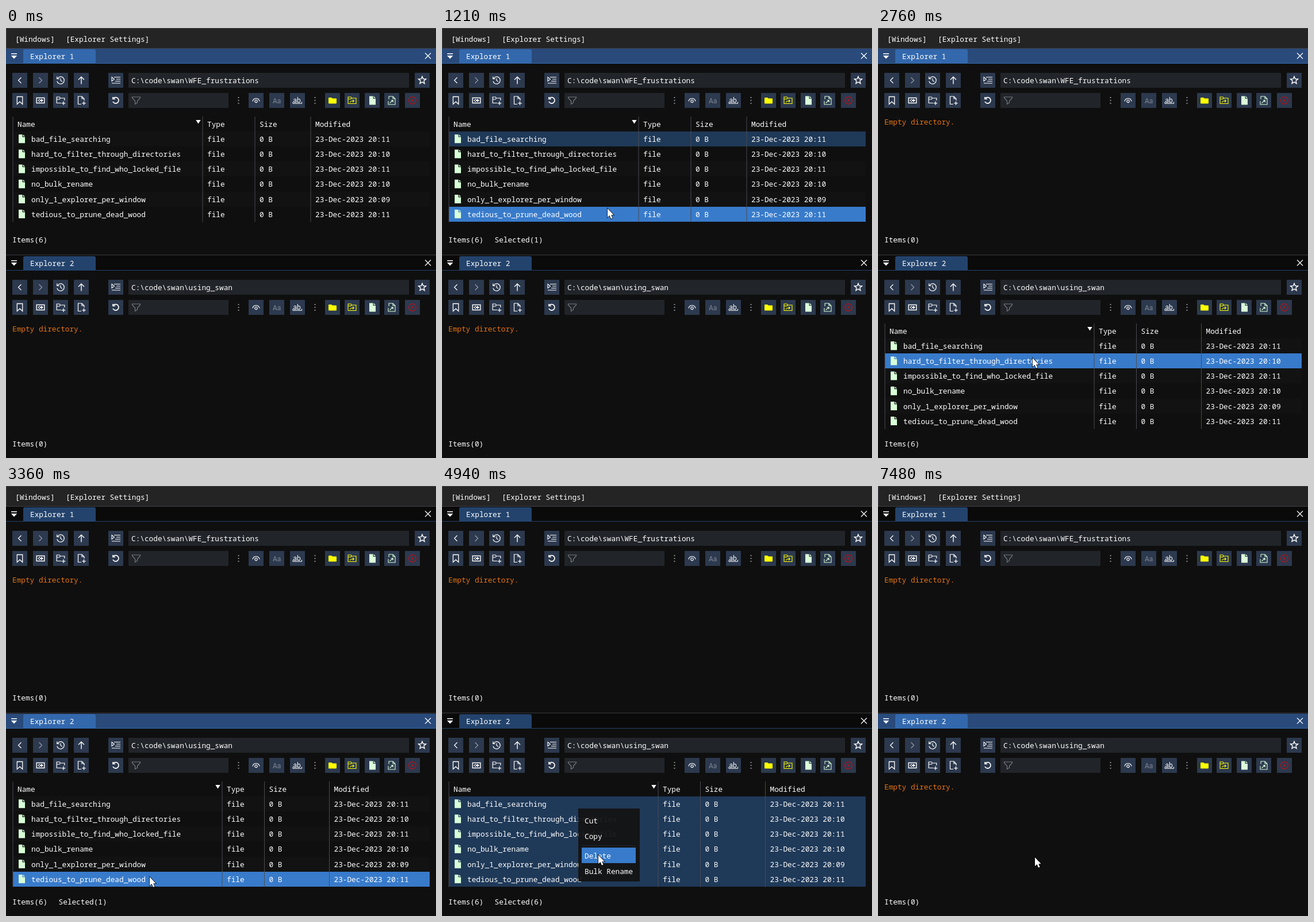
Write an HTML page with a canvas that moves like this. It is 748 by 748 pixels and loops after 7510 ms.

```html
<!DOCTYPE html>
<html lang="en">
<head>
<meta charset="utf-8">
<title>Explorer</title>
<style>
html, body { margin: 0; width: 100%; height: 100%; overflow: hidden; background: #0f0f0f; }
canvas { display: block; width: 100vw; height: 100vh; }
</style>
</head>
<body>
<canvas id="stage" width="748" height="748"></canvas>
<script>
const ctx = document.getElementById('stage').getContext('2d');
const LOOP = 7510;
const MONO = '12.75px "Noto Sans Mono", "DejaVu Sans Mono", monospace';
const SANS = '12px Roboto, "Open Sans", sans-serif';
const C = {
  bg: '#0f0f0f', bar: '#242424', edge: '#404046', line: '#4b4b52',
  title: '#294a7a', titleOff: '#0a0a0a', tab: '#3368ad', tabOff: '#23436c',
  button: '#2c394e', field: '#212429', hover: '#387bcb', selected: '#1f3958',
  orange: '#e57412', yellow: '#ffff00', green: '#d9ffd9', red: '#b3141c', dim: '#77797e'
};

// Moments when the interface state changes
const T = { pick: 850, pickAll: 1400, drag: 2080, drop: 2420, pick2: 3330,
            pickAll2: 3950, menu: 4350, confirm: 5100, gone: 5190 };

const FILES = [
  ['bad_file_searching', 11], ['hard_to_filter_through_directories', 10],
  ['impossible_to_find_who_locked_file', 11], ['no_bulk_rename', 10],
  ['only_1_explorer_per_window', 9], ['tedious_to_prune_dead_wood', 11]
];
const MENU = [['Cut', 568], ['Copy', 595], ['Delete', 629], ['Bulk Rename', 656]];

// time, x, y of the pointer tip
const PATH = [
  [280, -14, 215], [700, 270, 196], [900, 270, 194], [1210, 288, 314],
  [1450, 290, 321], [2030, 279, 298], [2080, 279, 300], [2300, 272, 520],
  [2430, 269, 562], [2760, 269, 574], [3250, 250, 680], [3400, 250, 680],
  [3930, 236, 561], [4450, 236, 561], [4900, 272, 642], [5060, 272, 642], [5200, 273, 646]
];

const DOC = 'M-5-7.5H1.5V-3H6V7.5H-5ZM2.7-7.5L6-4.2H2.7Z';
const FOLDER = 'M-7-4Q-7-5-6-5H-2L0-3.5H6Q7-3.5 7-2.5V4.5Q7 5.5 6 5.5H-6Q-7 5.5-7 4.5Z';
const ARROW = new Path2D('M0 0V15.2L3.5 12L6 17.8L8.6 16.7L6.2 11.2H10.6Z');

function rect(color, x, y, w, h, r = 0) {
  ctx.fillStyle = color;
  ctx.beginPath();
  ctx.roundRect(x, y, w, h, r);
  ctx.fill();
}

// y is the middle of the line
function text(str, x, y, color = '#fff', font = MONO) {
  ctx.font = font;
  ctx.fillStyle = color;
  ctx.fillText(str, x, y + 4.5);
}

function shape(path, x, y, color, width = 0) {
  ctx.save();
  ctx.translate(x, y);
  if (width) {
    ctx.strokeStyle = color;
    ctx.lineWidth = width;
    ctx.stroke(new Path2D(path));
  } else {
    ctx.fillStyle = color;
    ctx.fill(new Path2D(path));
  }
  ctx.restore();
}

function button(x, y, path, color = '#fff', width = 1.2) {
  rect(C.button, x - 13, y - 13, 26, 26);
  if (path) shape(path, x, y, color, width);
}

function star(r) {
  let d = '';
  for (let i = 0; i < 10; i++) {
    const a = i * Math.PI / 5, k = i % 2 ? r * 0.45 : r;
    d += (i ? 'L' : 'M') + (k * Math.sin(a)).toFixed(2) + ' ' + (-k * Math.cos(a)).toFixed(2);
  }
  return d + 'Z';
}

function dots(x, y) {
  for (const d of [-5, 0, 5]) rect('#85878b', x - 1, y + d - 1, 2, 2);
}

function toolbar(oy, path) {
  const a = oy + 91, b = oy + 126;
  button(24, a, 'M2.5-5L-2.5 0L2.5 5');
  button(60, a, 'M-2.5-5L2.5 0L-2.5 5', '#969ca6');
  button(95, a, 'M-5.6-3A6.3 6.3 0 1 1-6.2 1.5M-6.3-6.5V-2.6H-2.4M0-3.6V.5L3 2.2');
  button(131, a, 'M0 6.5V-6M-5-1L0-6L5-1', '#fff', 1.4);
  button(191, a, 'M-7-5.5L-2.5-2L-7 1.5ZM-3-5.5H8M1-2H8M-1 1.5H8M-7 5H8', '#fff', 1.1);
  rect(C.field, 213, a - 13, 488, 26);
  text(path, 218, a + 0.5);
  button(724, a, star(6.8), '#fff', 1.4);

  button(24, b, 'M-4.7-6.5H4.7V6.5L0 2.2L-4.7 6.5Z', '#fff', 1.3);
  button(60, b, 'M-6.8-4.5H6.8V4.5H-6.8Z', '#fff', 1.4);
  shape('M-1-3L-5 0L-1 3ZM1-3L5 0L1 3ZM-3-1H3V1H-3Z', 60, b, '#fff');
  button(95, b, 'M1 4.5H-6.8V-6H-2L-.5-4H6.8V0M-6.8-2H-2L-.5-4M5 1.5V8M1.8 4.8H8.2');
  button(131, b, 'M0 6.5H-5.5V-7H1L5-3V0M1-7V-3H5M4.5 1.5V8M1.3 4.8H7.7');
  button(191, b, 'M-4.3-3.4A5.2 5.2 0 1 1-5 2M-5-6V-2.5H-1.2', '#fff', 1.7);
  rect(C.field, 213, b - 13, 174, 26);
  shape('M-7-6H7V-4.5L2 1V4L-2 6.5V1L-7-4.5Z', 226.5, b, C.dim, 1.2);
  dots(404.5, b);
  button(435, b, 'M-6 1.5C-4.5-5.2 4.5-5.2 6 1.5M2.2 1.5A2.2 2.2 0 1 1 2.2 1.4Z');
  button(471, b);
  text('Aa', 464, b, '#7d8592', SANS);
  button(507, b);
  text('ab', 499.5, b - 1, '#fff', SANS);
  shape('M-8 2.5V5.3H7.5V2.5', 507, b, '#fff', 1);
  dots(537.5, b);
  button(568, b, FOLDER, C.yellow, 0);
  button(602, b, 'M-7-6H-2L-.5-4H7V5.5H-7ZM-7-2.5H-2L-.5-4M-3.5 3.5Q-3 .8 3 .8M1-1.3L3.3 .8L1 3', C.yellow, 1.1);
  button(637, b, DOC, C.green, 0);
  button(671, b, 'M-5-2V-7H2L6-3V7H0M2-7V-3H6M-6 1V7H0M-3.5 4.5L2 0M-1.5-.3H2.2V3.2', C.green, 1.1);
  button(707, b, 'M6.3 0A6.3 6.3 0 1 1 6.3-.1ZM-2.5-2.5L2.5 2.5M2.5-2.5L-2.5 2.5', C.red, 1.3);
}

function titleBar(oy, name, focused) {
  rect(focused ? C.title : C.titleOff, 0, oy + 36, 748, 26);
  const tab = focused ? C.tab : C.tabOff;
  rect(tab, 30, oy + 37, 126, 25, [3, 3, 0, 0]);
  rect(tab, 0, oy + 61, 748, 1);
  rect('#fff', 9, oy + 44, 10, 1.5);
  shape('M-5.2 0H5.2L0 5.6Z', 14, oy + 48, '#fff');
  text(name, 42, oy + 49.5);
  shape('M-5-5L5 5M5-5L-5 5', 734, oy + 48.5, '#fff', 1.2);
}

const rowTop = i => Math.round(180 + 26.15 * i);

function table(oy, cols, selected, pointer) {
  FILES.forEach(([name, min], i) => {
    const top = oy + rowTop(i), h = rowTop(i + 1) - rowTop(i), mid = oy + 193.5 + 26.15 * i;
    const over = pointer && pointer.y >= top && pointer.y < top + h;
    const color = over ? C.hover : selected(i) ? C.selected : i % 2 ? C.bg : '#121212';
    rect(color, 12, top, 725, h);
    shape(DOC, 27, mid - 0.7, C.green);
    text(name, 44, mid);
    text('file', cols[0] + 8, mid);
    text('0 B', cols[1] + 8, mid);
    text('23-Dec-2023 20:' + String(min).padStart(2, '0'), cols[2] + 8, mid);
  });
  ['Name', 'Type', 'Size', 'Modified'].forEach((s, i) =>
    text(s, i ? cols[i - 1] + 8 : 20, oy + 167.5));
  shape('M-4.2-3.2H4.2L0 3.2Z', cols[0] - 7.5, oy + 163.2, '#fff');
  for (const x of [12, ...cols]) rect(C.line, x - 0.5, oy + 154, 1, 183.5);
}

function explorer(e, s) {
  titleBar(e.oy, e.name, s.focused);
  toolbar(e.oy, e.path);
  if (s.full) table(e.oy, e.cols, i => s.selected.includes(i), s.pointer);
  else text('Empty directory.', 11, e.oy + 163, C.orange);
  text(`Items(${s.full ? 6 : 0})`, 11, e.foot);
  if (s.full && s.selected.length) text(`Selected(${s.selected.length})`, 91.5, e.foot);
}

function popup(p) {
  rect('rgba(20,20,20,0.94)', 237, 561, 107, 127);
  rect('#26262a', 243, 625, 94, 1);
  for (const [label, y] of MENU) {
    if (p.x >= 243 && p.y >= y && p.y < y + 27) rect(C.hover, 243, y, 94, 27);
    text(label, 248, y + 14);
  }
}

function pointerAt(t) {
  if (t < PATH[0][0]) return null;
  const i = PATH.findIndex(k => k[0] > t);
  if (i < 0) {
    const [, x, y] = PATH[PATH.length - 1];
    return { x, y };
  }
  const [t0, x0, y0] = PATH[i - 1], [t1, x1, y1] = PATH[i];
  const u = (t - t0) / (t1 - t0), k = u * u * (3 - 2 * u);
  return { x: x0 + (x1 - x0) * k, y: y0 + (y1 - y0) * k };
}

function selection(t) {
  const all = [0, 1, 2, 3, 4, 5];
  if (t < T.pick) return [];
  if (t < T.pickAll) return [0];
  if (t < T.drop) return all;
  if (t < T.pick2) return [];
  return t < T.pickAll2 ? [5] : all;
}

const TOP = { oy: 0, name: 'Explorer 1', path: 'C:\\code\\swan\\WFE_frustrations', cols: [342, 433, 530], foot: 368.5 };
const LOW = { oy: 360, name: 'Explorer 2', path: 'C:\\code\\swan\\using_swan', cols: [376, 449.5, 562.5], foot: 723 };

function draw(t) {
  const p = pointerAt(t), selected = selection(t);
  const open = t >= T.menu && t < T.confirm;
  const dragging = t >= T.drag && t < T.drop;
  const pointer = open || dragging || !p || p.x < 12 ? null : p;

  rect(C.bg, 0, 0, 748, 748);
  rect(C.bar, 0, 0, 748, 36);
  rect(C.edge, 0, 0, 748, 1);
  rect(C.edge, 0, 0, 1, 36);
  rect(C.edge, 0, 35, 748, 1);
  text('[Windows]', 16, 19.5);
  text('[Explorer Settings]', 104, 19.5);

  explorer(TOP, { focused: t < T.pick2, full: t < T.drop, selected, pointer });
  rect('#2c2c31', 0, 394, 748, 1.5);
  explorer(LOW, { focused: t >= T.pick2 && !open, full: t >= T.drop && t < T.gone, selected, pointer });
  if (open) popup(p);

  if (p) {
    ctx.save();
    ctx.translate(p.x, p.y);
    ctx.lineWidth = 1.4;
    ctx.strokeStyle = '#000';
    ctx.stroke(ARROW);
    ctx.fillStyle = '#fff';
    ctx.fill(ARROW);
    ctx.restore();
  }
}

const start = performance.now();
function tick() {
  draw((performance.now() - start) % LOOP);
  requestAnimationFrame(tick);
}
tick();
</script>
</body>
</html>
```
